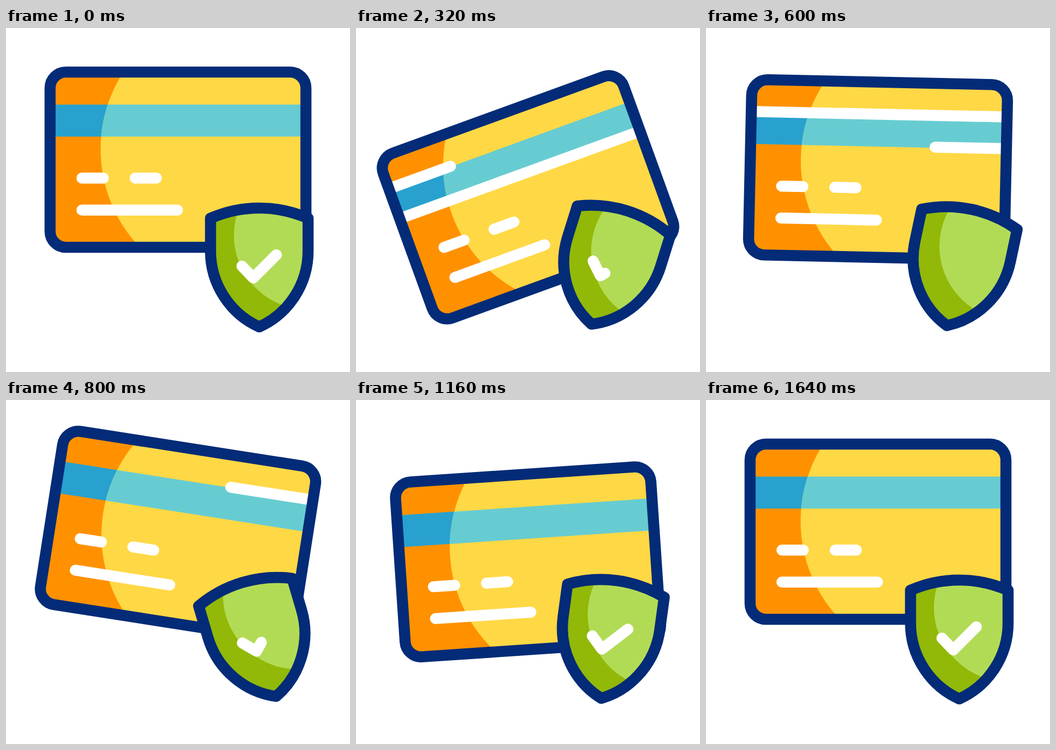
These frames come from a looping animation (640x640 px, 2000 ms). An HTML page:

```html
<!DOCTYPE html>
<html lang="en">
<head>
<meta charset="utf-8">
<title>Secure card</title>
<style>
  html, body { margin: 0; width: 100%; height: 100%; overflow: hidden; background: #fff; }
  svg { display: block; width: 100%; height: 100%; }
  .line { fill: none; stroke: #fff; stroke-width: 20.5; stroke-linecap: round; stroke-linejoin: round; }
  .edge { fill: none; stroke: #032b77; stroke-width: 20.6; stroke-linejoin: round; }
</style>
</head>
<body>
<svg viewBox="0 0 640 640">
  <defs>
    <rect id="cardShape" x="82" y="82" width="476" height="326" rx="29.5"/>
    <path id="shieldShape" d="M380.5 354A226 226 0 0 1 562 354V415C562 477 525 532 471.2 556C417.500 532 380.500 477 380.500 415Z"/>
    <clipPath id="cardClip"><use href="#cardShape"/></clipPath>
    <clipPath id="shieldClip"><use href="#shieldShape"/></clipPath>
    <clipPath id="glowClip"><circle cx="441" cy="225.500" r="265"/></clipPath>
  </defs>
  <g id="card">
    <g clip-path="url(#cardClip)">
      <path fill="#ff9100" d="M72 72H568V418H72Z"/>
      <path fill="#28a1ce" d="M72 142.500H568V202H72Z"/>
      <g clip-path="url(#glowClip)">
        <path fill="#ffd845" d="M72 72H568V418H72Z"/>
        <path fill="#67ccd1" d="M72 142.500H568V202H72Z"/>
      </g>
    </g>
    <path class="line" d="M141.300 279.300H181M240.300 279.300H279.700M141.300 338.700H319"/>
    <path class="line" id="upper" pathLength="1" d="M82 141.600H558"/>
    <path class="line" id="lower" pathLength="1" d="M82 200.700H558"/>
    <use href="#cardShape" class="edge"/>
  </g>
  <g id="shield">
    <g clip-path="url(#shieldClip)">
      <path fill="#92b808" d="M360 320H590V570H360Z"/>
      <circle fill="#b2db55" cx="562" cy="386" r="138"/>
    </g>
    <path class="line" id="tick" pathLength="1" d="M439 443L460 465L503 422"/>
    <use href="#shieldShape" class="edge"/>
  </g>
</svg>
<script>
  const LOOP = 2000, STEP = 40;
  const $ = id => document.getElementById(id);

  // Keys: [time, value, softness of arrival (1 = full stop)]
  const tracks = {
    cardTurn: [[45, 0], [327, -20], [752, 10], [1036, -5], [1433, 0]],
    cardDrop: [[0, 0], [312, 70], [748, 0], [1041, 80], [1370, 0]],
    shieldTurn: [[0, 0], [518, 30, 0.78], [720, -20], [1093, 10], [1366, -5], [1640, 0]],
    lowerHead: [[0, 0], [307, 1]],
    lowerTail: [[388, 0], [713, 1]],
    upperHead: [[214, 0], [534, 1]],
    upperTail: [[602, 0], [922, 1]],
    tickHead: [[85, 1], [521, 0], [600, 0], [980, 1]]
  };

  function at(name, t) {
    const keys = tracks[name];
    if (t <= keys[0][0]) return keys[0][1];
    for (let i = 1; i < keys.length; i++) {
      const [t0, v0] = keys[i - 1], [t1, v1, soft = 1] = keys[i];
      if (t < t1) {
        const s = (t - t0) / (t1 - t0);
        return v0 + (v1 - v0) * (3 * soft * s * s * (1 - s) + s ** 3);
      }
    }
    return keys[keys.length - 1][1];
  }

  function trim(id, from, to) {
    const el = $(id), len = to - from;
    el.style.visibility = len > 0.002 ? "visible" : "hidden";
    el.setAttribute("stroke-dasharray", `${Math.max(len, 0.002)} 2`);
    el.setAttribute("stroke-dashoffset", -from);
  }

  function draw(now) {
    const t = Math.floor((now % LOOP) / STEP) * STEP;
    $("card").setAttribute("transform",
      `translate(0 ${at("cardDrop", t)}) rotate(${at("cardTurn", t)} 320 245)`);
    $("shield").setAttribute("transform", `rotate(${at("shieldTurn", t)} 471 445)`);
    trim("lower", at("lowerTail", t), at("lowerHead", t));
    trim("upper", at("upperTail", t), at("upperHead", t));
    trim("tick", 0, at("tickHead", t));
  }

  const start = performance.now();
  function loop() {
    draw(performance.now() - start);
    requestAnimationFrame(loop);
  }
  loop();
</script>
</body>
</html>
```
